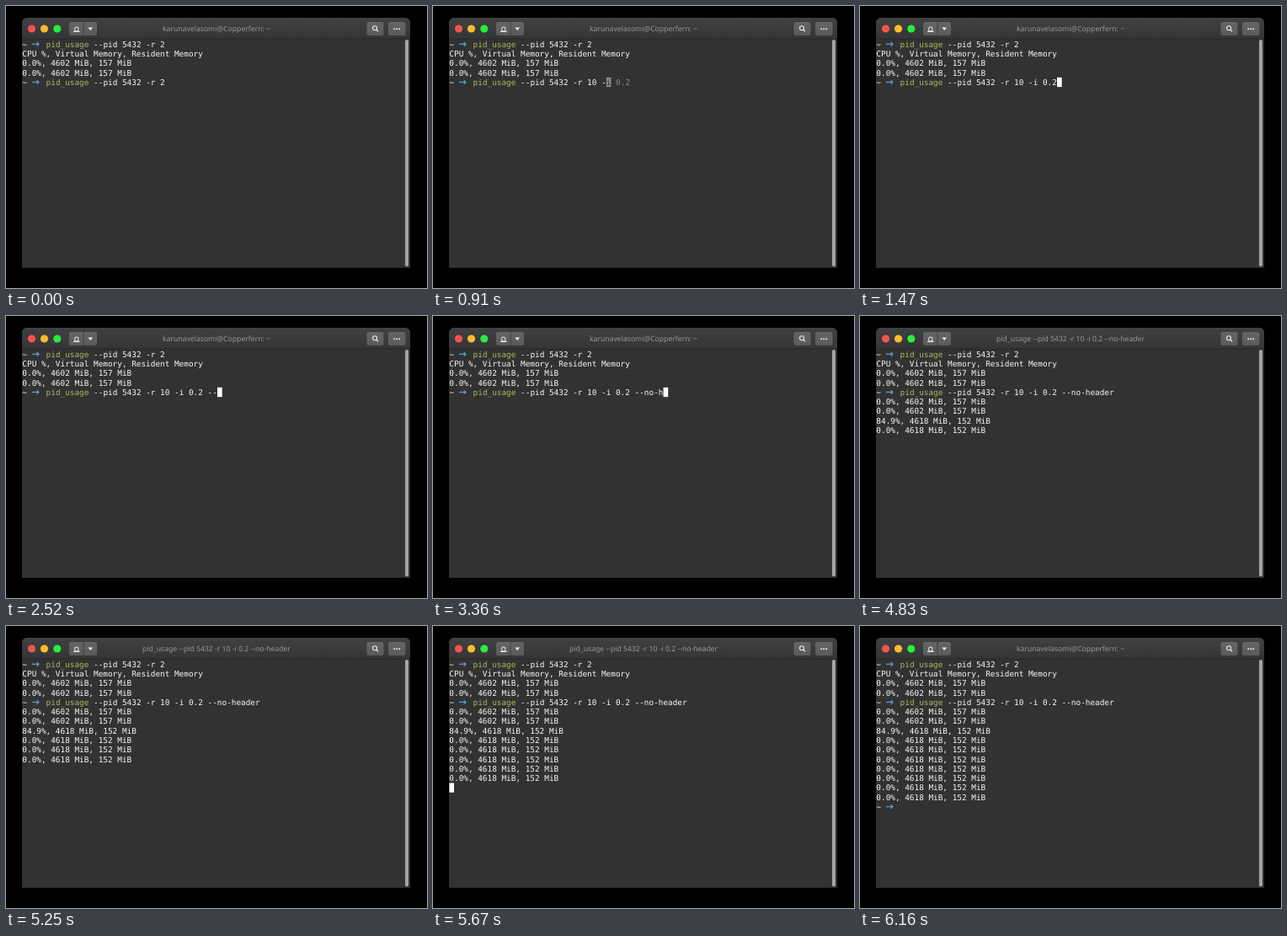
Animation of 500x335 px, one loop 6300 ms. Source, as an HTML page with a canvas:

```html
<!DOCTYPE html>
<html lang="en">
<head>
<meta charset="utf-8">
<title>Terminal</title>
<style>
  html, body { margin: 0; width: 100%; height: 100%; overflow: hidden; background: #000; }
  canvas { display: block; }
</style>
</head>
<body>
<canvas id="stage" width="500" height="335"></canvas>
<script>
const ctx = document.getElementById('stage').getContext('2d');
ctx.textRendering = 'geometricPrecision';
const LOOP = 6300;
const LEFT = 19.35, TOP = 39.7, CELL_W = 5.65, CELL_H = 11.29;
const MONO = '9.385px "DejaVu Sans Mono", monospace';
const COLORS = { bg: '#323232', text: '#f8f8f3', command: '#a5ba62', arrow: '#6798c8', hint: '#8a8a8a' };

const HOME_TITLE = 'karunavelasomi@Copperfern: ~';
const COMMAND = 'pid_usage';
const ARGS = ' --pid 5432 -r ';
const FULL = '10 -i 0.2 --no-header';
const HINT_END = '10 -i 0.2'.length;
const ENTER = 4060, DONE = 6160;

// [time, number of characters of FULL typed so far]
const KEYS = [[420, 0], [560, 1], [630, 2], [840, 3], [910, 4], [1470, 9], [2100, 10],
  [2380, 11], [2520, 12], [2730, 13], [2800, 14], [3150, 15], [3360, 16],
  [3500, 18], [3710, 19], [3850, 21]];

// Time at which each result line is printed
const PRINTS = [4200, 4410, 4620, 4830, 5040, 5250, 5460, 5670, 5880, 6090];
const IDLE = '0.0%, 4602 MiB, 157 MiB';
const result = i => i < 2 ? IDLE : `${i === 2 ? '84.9' : '0.0'}%, 4618 MiB, 152 MiB`;

const cellX = col => LEFT + col * CELL_W;
const cellY = row => TOP + row * CELL_H;

function box(x, y, w, h, radius, fill, stroke) {
  ctx.beginPath();
  ctx.roundRect(x, y, w, h, radius);
  if (fill) { ctx.fillStyle = fill; ctx.fill(); }
  if (stroke) { ctx.strokeStyle = stroke; ctx.lineWidth = 1; ctx.stroke(); }
}

function disc(x, y, r, fill) {
  ctx.beginPath();
  ctx.arc(x, y, r, 0, Math.PI * 2);
  ctx.fillStyle = fill;
  ctx.fill();
}

function line(color, width, ...points) {
  ctx.beginPath();
  points.forEach(([x, y]) => ctx.lineTo(x, y));
  ctx.strokeStyle = color;
  ctx.lineWidth = width;
  ctx.stroke();
}

function vertical(y0, y1, top, bottom) {
  const gradient = ctx.createLinearGradient(0, y0, 0, y1);
  gradient.addColorStop(0, top);
  gradient.addColorStop(1, bottom);
  return gradient;
}

function write(text, col, row, color = COLORS.text) {
  ctx.font = MONO;
  ctx.textAlign = 'left';
  ctx.fillStyle = color;
  ctx.fillText(text, cellX(col), cellY(row) + 9);
}

function cursor(col, row, under = '') {
  ctx.fillStyle = under ? COLORS.hint : '#fff';
  ctx.fillRect(cellX(col), cellY(row), CELL_W, CELL_H);
  if (under) write(under, col, row, COLORS.bg);
}

function prompt(row, args) {
  write('~', 0, row);
  const x = cellX(2) + 0.3, y = cellY(row) + 5.6;
  line(COLORS.arrow, 1.3, [x, y], [x + 8, y]);
  line(COLORS.arrow, 1.2, [x + 5.6, y - 2.4], [x + 8.1, y], [x + 5.6, y + 2.4]);
  if (args === undefined) return;
  write(COMMAND, 5, row, COLORS.command);
  write(args, 5 + COMMAND.length, row);
}

function drawWindow(title) {
  ctx.fillStyle = '#000';
  ctx.fillRect(0, 0, 500, 335);
  box(19, 14, 461, 297, [6, 6, 0, 0], COLORS.bg);
  box(19, 14, 461, 25, [6, 6, 0, 0], vertical(14, 39, '#404142', '#343536'));
  line('#282828', 1, [19, 39], [480, 39]);

  disc(30.5, 27, 4.6, '#f0544f');
  disc(45.5, 27, 4.6, '#fbbc2d');
  disc(60.8, 27, 4.6, '#28ee3e');

  const face = vertical(19, 35, '#646566', '#5a5b5c');
  for (const [x, w] of [[75, 33], [428.5, 20], [454, 20.5]])
    box(x, 19, w, 16, 2.5, face);
  line('#3f4041', 1, [92, 19], [92, 35]);

  const icon = '#eeeeec';
  box(81.8, 25.2, 4, 4.8, 0.6, null, icon);
  line(icon, 1.2, [80, 30.4], [87.6, 30.4]);
  ctx.beginPath();
  ctx.moveTo(97.3, 25.6);
  ctx.lineTo(103.1, 25.6);
  ctx.lineTo(100.2, 29);
  ctx.fillStyle = icon;
  ctx.fill();
  ctx.beginPath();
  ctx.arc(438, 26.3, 2.5, 0, Math.PI * 2);
  ctx.strokeStyle = icon;
  ctx.lineWidth = 1.1;
  ctx.stroke();
  line(icon, 1.3, [439.8, 28.1], [442, 30.3]);
  for (const x of [461.2, 464.2, 467.2]) disc(x, 27.2, 1, icon);

  ctx.font = '8.65px "Noto Sans", "Open Sans", sans-serif';
  ctx.textAlign = 'center';
  ctx.fillStyle = '#969895';
  ctx.fillText(title, 250, 30);

  box(474, 40, 4, 269.5, 2, '#a4a4a2');
}

function drawTyping(time) {
  const key = KEYS.findLast(([at]) => time >= at);
  if (!key) {
    prompt(4, ARGS + '2');
    if (time >= 350) cursor(30, 4);
    return;
  }
  const count = key[1];
  const col = 5 + COMMAND.length + ARGS.length + count;
  const hint = count > 0 ? FULL.slice(count, HINT_END) : '';
  prompt(4, ARGS + FULL.slice(0, count));
  write(hint, col, 4, COLORS.hint);
  cursor(col, 4, hint.charAt(0));
}

function drawRun(time) {
  prompt(4, ARGS + FULL);
  const printed = PRINTS.filter(at => time >= at).length;
  for (let i = 0; i < printed; i++) write(result(i), 0, 5 + i);
  if (time >= DONE) prompt(5 + printed);
  else if (time < 4690 || (time >= 5320 && time < 5950)) cursor(0, 5 + printed);
}

function draw(time) {
  const running = time >= ENTER && time < DONE;
  drawWindow(running ? COMMAND + ARGS + FULL : HOME_TITLE);
  prompt(0, ARGS + '2');
  write('CPU %, Virtual Memory, Resident Memory', 0, 1);
  write(IDLE, 0, 2);
  write(IDLE, 0, 3);
  if (time < ENTER) drawTyping(time);
  else drawRun(time);
}

const start = performance.now();
function tick() {
  draw((performance.now() - start) % LOOP);
  requestAnimationFrame(tick);
}
tick();
</script>
</body>
</html>
```
